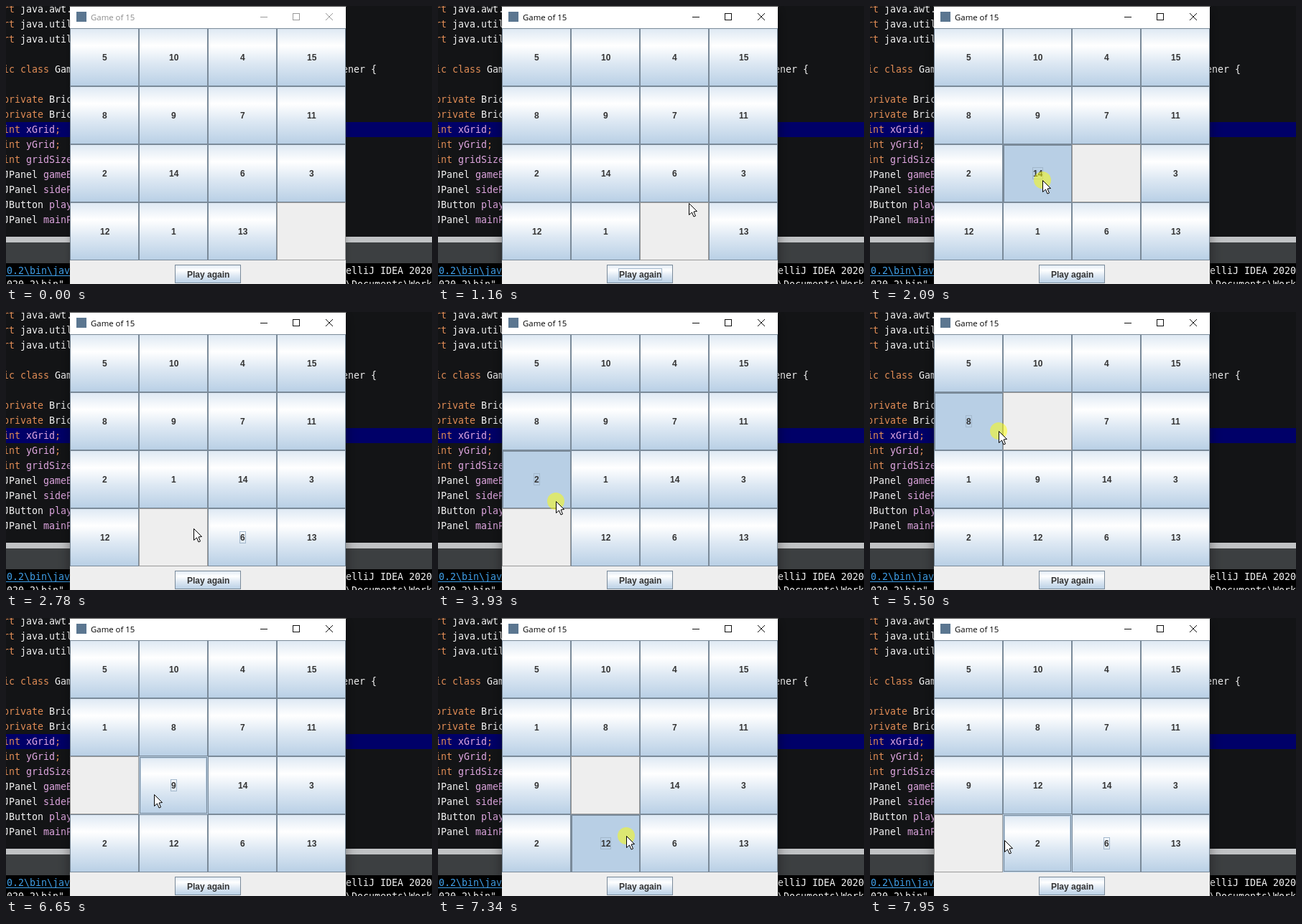
An HTML page with a canvas for the animation above (8 s loop, 593 by 388 pixels).

```html
<!DOCTYPE html>
<html lang="en">
<head>
<meta charset="utf-8">
<title>Game of 15</title>
<style>
html, body { margin: 0; width: 100%; height: 100%; overflow: hidden; background: #131416; }
canvas { display: block; }
</style>
</head>
<body>
<canvas id="stage" width="593" height="388"></canvas>
<script>
const g = document.getElementById('stage').getContext('2d');
const LOOP = 8000, PRESS = 200;
const LEFT = 89, TOP = 31, CW = 96, CH = 81, WIDTH = 4 * CW;
const CODE = '13.29px "DejaVu Sans Mono", "Noto Sans Mono", monospace';
const BOLD = 'bold 12px "Liberation Sans", Arial, sans-serif';
const TITLE = '11.4px "Open Sans", "Noto Sans", sans-serif';
const ORANGE = '#e08c55', PLAIN = '#f2f2f2', FIELD = '#dfa6e0', LINK = '#3f9fe8';
const EDGE = '#7a8a99', BLUE = '#b8cfe5', PANEL = '#eeeeee';
const PLAY = 16;

const START = [5, 10, 4, 15, 8, 9, 7, 11, 2, 14, 6, 3, 12, 1, 13, 0];

// where the pointer comes from, then each click: release time and place
const ENTRY = [220, 330, 410];
const CLICKS = [
  [800, 350, 322], [1620, 348, 247], [2290, 240, 243], [2780, 261, 302],
  [3400, 148, 316], [4090, 164, 264], [4600, 222, 246], [5170, 214, 172],
  [5650, 179, 166], [6140, 168, 238], [6900, 207, 246], [7420, 262, 304],
  [7700, 158, 312], [8200, 189, 310]
];

const cellAt = (x, y) => Math.floor((y - TOP) / CH) * 4 + Math.floor((x - LEFT) / CW);

function pointer(t) {
  let [t0, x0, y0] = ENTRY;
  for (const [up, x, y] of CLICKS) {
    if (t < up) {
      const u = Math.max(0, Math.min(1, (t - t0) / (up - PRESS - t0)));
      const k = u * u * (3 - 2 * u);
      return [Math.round(x0 + (x - x0) * k), Math.round(y0 + (y - y0) * k)];
    }
    [t0, x0, y0] = [up, x, y];
  }
}

function stateAt(t) {
  const board = START.slice();
  let focus = -1, pressed = -1;
  for (const [up, x, y] of CLICKS) {
    if (t < up - PRESS) break;
    const at = cellAt(x, y), gap = board.indexOf(0);
    if (t < up) {
      focus = pressed = at;
      break;
    }
    // the emptied button hands focus to the next enabled one
    focus = at + 1 === gap ? at + 2 : at + 1;
    board[gap] = board[at];
    board[at] = 0;
  }
  return { board, focus, pressed, active: t >= CLICKS[0][0] - PRESS };
}

function fill(color, x, y, w, h) {
  g.fillStyle = color;
  g.fillRect(x, y, w, h);
}

function frame(color, x, y, w, h) {
  g.strokeStyle = color;
  g.lineWidth = 1;
  g.strokeRect(x + 0.5, y + 0.5, w - 1, h - 1);
}

function code(x, y, ...parts) {
  g.font = CODE;
  g.textAlign = 'left';
  for (const [text, color] of parts) {
    g.fillStyle = color;
    g.fillText(text, x, y);
    x += text.length * 8;
  }
}

function drawEditor() {
  fill('#131416', 0, 0, 593, 388);
  fill('#000068', 0, 162, 593, 21);
  const row = n => 9 + n * 21;
  ['java.awt.*', 'java.util.', 'java.util.'].forEach((name, i) =>
    code(-36, row(i), ['import ', ORANGE], [name, PLAIN]));
  code(-36, row(4), ['public class ', ORANGE], ['Game', PLAIN]);
  code(468, row(4), ['ener {', PLAIN]);
  for (const n of [6, 7]) code(-4, row(n), ['private ', ORANGE], ['Brick', PLAIN]);
  ['xGrid', 'yGrid', 'gridSize'].forEach((name, i) =>
    code(-4, row(8 + i), ['int ', ORANGE], [name, FIELD], [';', ORANGE]));
  ['JPanel gameB', 'JPanel sideP', 'JButton play', 'JPanel mainP'].forEach((line, i) => {
    const [type, name] = line.split(' ');
    code(-4, row(11 + i), [type + ' ', PLAIN], [name, FIELD]);
  });

  fill('#c1c3c5', 0, 322, 593, 8);
  fill('#3c3f41', 0, 330, 593, 29);
  fill('#000000', 0, 359, 593, 29);
  code(1, 374, ['0.2\\bin\\java', LINK]);
  fill(LINK, 0, 376, 89, 1);
  code(473, 374, ['elliJ IDEA 2020', PLAIN]);
  code(-7, 393, ['2020.2\\bin" ', PLAIN]);
  code(473, 393, ['\\Documents\\Work', PLAIN]);
}

function drawWindow(active) {
  g.save();
  g.shadowColor = active ? 'rgba(0,0,0,0.4)' : 'rgba(0,0,0,0.25)';
  g.shadowBlur = active ? 16 : 8;
  g.shadowOffsetY = 2;
  fill(PANEL, LEFT, 1, WIDTH, 400);
  g.restore();
  fill('#4a4a4a', LEFT - 1, 0, WIDTH + 2, 1);
  fill('#ffffff', LEFT, 1, WIDTH, 30);
  fill('#5b7690', 98, 8, 14, 14);

  g.font = TITLE;
  g.textAlign = 'left';
  g.fillStyle = active ? '#000000' : '#8c8c8c';
  g.fillText('Game of 15', 118, 20);

  const ink = active ? '#111111' : '#999999';
  fill(ink, 354, 15, 10, 1);
  frame(ink, 399, 10, 10, 10);
  g.beginPath();
  g.moveTo(445, 10);
  g.lineTo(455, 20);
  g.moveTo(455, 10);
  g.lineTo(445, 20);
  g.stroke();
}

function drawButton(label, x, y, w, h, look) {
  if (look.pressed) {
    fill(BLUE, x, y, w, h);
    frame(EDGE, x, y, w, h);
    fill(EDGE, x, y, w, 2);
    fill(EDGE, x, y, 2, h);
  } else {
    const shade = g.createLinearGradient(0, y, 0, y + h);
    shade.addColorStop(0, '#dde8f3');
    shade.addColorStop(0.3, '#ffffff');
    shade.addColorStop(0.6, '#dde8f3');
    shade.addColorStop(1, BLUE);
    fill(shade, x, y, w, h);
    frame(EDGE, x, y, w, h);
    if (look.hover) {
      frame(BLUE, x, y, w, h);
      frame(EDGE, x + 1, y + 1, w - 2, h - 2);
      frame(BLUE, x + 2, y + 2, w - 4, h - 4);
    }
  }
  g.font = BOLD;
  g.textAlign = 'left';
  g.fillStyle = '#333333';
  const tw = Math.round(g.measureText(label).width);
  const tx = x + Math.ceil((w - tw) / 2), base = y + Math.floor(h / 2) + 5;
  g.fillText(label, tx, base);
  if (look.focus) frame('#a3b8cc', tx - 1, base - 13, tw + 2, 17);
}

function drawBoard(state, mx, my) {
  const over = cellAt(mx, my);
  state.board.forEach((tile, i) => {
    const x = LEFT + (i % 4) * CW, y = TOP + Math.floor(i / 4) * CH;
    if (tile) {
      drawButton(String(tile), x, y, CW, CH, {
        pressed: state.pressed === i,
        focus: state.focus === i,
        hover: over === i
      });
    } else {
      fill(PANEL, x, y, CW, CH);
      frame('#999999', x, y, CW, CH);
    }
  });
  drawButton('Play again', 235, 361, 92, 26, { focus: state.focus === PLAY });
}

function drawPointer(x, y, down) {
  if (down) {
    g.fillStyle = 'rgba(255,255,0,0.5)';
    g.beginPath();
    g.arc(x, y, 12, 0, Math.PI * 2);
    g.fill();
  }
  g.save();
  g.translate(x + 0.5, y + 0.5);
  g.beginPath();
  g.moveTo(0, 0);
  for (const [px, py] of [[0, 16], [4, 12.5], [6.5, 18.5], [9, 17.5], [6.5, 11.5], [11, 11]]) {
    g.lineTo(px, py);
  }
  g.closePath();
  g.fillStyle = '#ffffff';
  g.fill();
  g.strokeStyle = '#000000';
  g.lineWidth = 1;
  g.stroke();
  g.restore();
}

function draw(t) {
  const state = stateAt(t);
  const [x, y] = pointer(t);
  drawEditor();
  drawWindow(state.active);
  drawBoard(state, x, y);
  drawPointer(x, y, state.pressed >= 0);
}

const begin = performance.now();
function tick() {
  draw((performance.now() - begin) % LOOP);
  requestAnimationFrame(tick);
}
tick();
</script>
</body>
</html>
```
